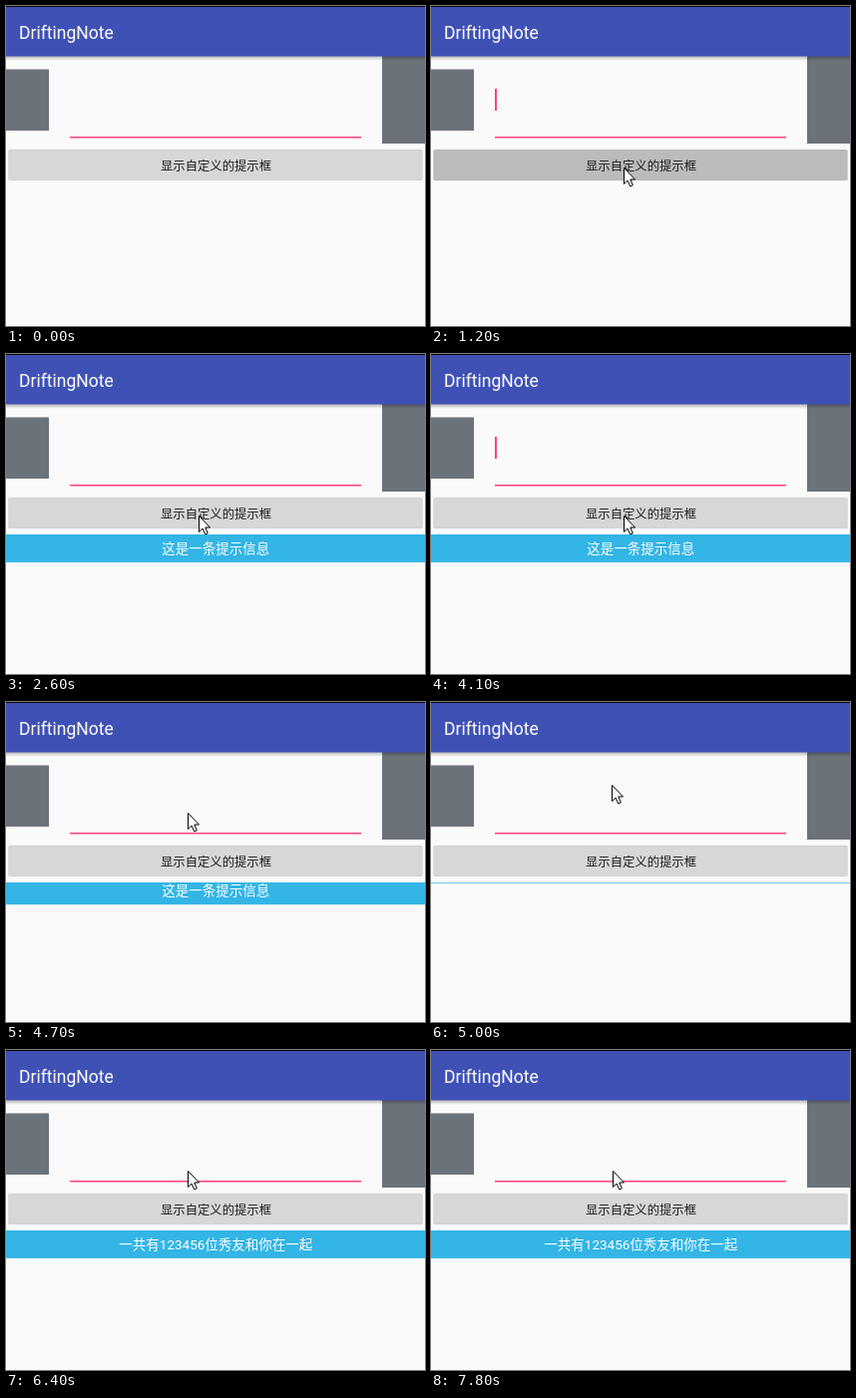
Animation of 420 by 321 pixels, one loop 8000 ms. Source, as an HTML page with a canvas:

```html
<!DOCTYPE html>
<html lang="zh-CN">
<head>
<meta charset="utf-8">
<title>DriftingNote</title>
<style>
  html, body { margin: 0; width: 100%; height: 100%; overflow: hidden; background: #fafafa; }
  canvas { display: block; width: 420px; height: 321px; }
</style>
</head>
<body>
<canvas id="stage" width="420" height="321"></canvas>
<script>
const ctx = document.getElementById('stage').getContext('2d');
const W = 420, H = 321, LOOP = 8000, STEP = 100;
const FONT = 'Roboto, "Noto Sans CJK SC", "Noto Sans CJK", sans-serif';
const PINK = '#ff4081', SLATE = '#6c727a';
const TOAST = { y: 181, h: 28, slide: 500 };

const toasts = [
  { text: '这是一条提示信息', from: 1320, leave: 4550 },
  { text: '一共有123456位秀友和你在一起', from: 5920, leave: Infinity }
];

// Intervals in which the text caret is lit
const caretOn = [[200, 700], [1200, 1700], [2200, 2600], [3100, 3600],
  [4100, 4600], [5100, 5500], [5800, 6300], [7400, 7800]];

// Pointer path: time, x, y
const pointerPath = [[200, 389, 165], [500, 270, 164], [800, 193, 162],
  [4400, 193, 162], [4700, 182, 111], [5000, 181, 83], [5300, 181, 73],
  [5800, 180, 64], [6000, 181, 72], [6200, 182, 97], [6400, 182, 121]];

const clamp = v => Math.min(1, Math.max(0, v));
const ease = p => 0.5 - Math.cos(Math.PI * clamp(p)) / 2;
const mix = (a, b, p) => a + (b - a) * p;

function rect(x, y, w, h, color) {
  ctx.fillStyle = color;
  ctx.fillRect(x, y, w, h);
}

function label(text, x, y, size, color, align = 'center') {
  ctx.font = `${size}px ${FONT}`;
  ctx.textAlign = align;
  ctx.fillStyle = color;
  ctx.fillText(text, x, y);
}

function drawPage() {
  rect(0, 0, W, H, '#fafafa');
  rect(0, 63.5, 43, 61.5, SLATE);
  rect(377, 50, 43, 88, SLATE);
  const shadow = ctx.createLinearGradient(0, 50, 0, 55);
  shadow.addColorStop(0, 'rgba(0,0,0,0.28)');
  shadow.addColorStop(1, 'rgba(0,0,0,0)');
  rect(0, 50, W, 5, shadow);
  rect(0, 0, W, 50.5, '#3f51b5');
  rect(0, 0, W, 1, '#000');
  label('DriftingNote', 13, 32.5, 17.5, '#fff', 'left');
  rect(64, 131, 292, 1.5, PINK);
}

function drawButton(t) {
  const press = t < 1200 ? 0 : 1 - clamp((t - 1300) / 400);
  const shade = Math.round(mix(215, 187, press));
  ctx.fillStyle = `rgb(${shade - 1},${shade},${shade})`;
  ctx.beginPath();
  ctx.roundRect(2.5, 144, 415, 31, 1.5);
  ctx.fill();
  ctx.strokeStyle = 'rgba(0,0,0,0.05)';
  ctx.lineWidth = 1;
  ctx.stroke();
  label('显示自定义的提示框', 210.5, 164.6, 12.33, '#1c1c1c');
}

function drawToast({ text, from, leave }, t) {
  const shown = ease((t - from) / TOAST.slide) - ease((t - leave) / TOAST.slide);
  if (shown <= 0) return;
  ctx.save();
  ctx.beginPath();
  ctx.rect(0, TOAST.y, W, TOAST.h);
  ctx.clip();
  ctx.translate(0, TOAST.y - TOAST.h * (1 - shown));
  rect(0, 0, W, TOAST.h, '#33b5e5');
  label(text, 210.3, 19.2, 13.5, '#fff');
  ctx.restore();
}

function pointerAt(t) {
  const next = pointerPath.findIndex(p => p[0] > t);
  if (next < 0) return pointerPath[pointerPath.length - 1].slice(1);
  const [t0, x0, y0] = pointerPath[next - 1];
  const [t1, x1, y1] = pointerPath[next];
  const p = (t - t0) / (t1 - t0);
  return [mix(x0, x1, p), mix(y0, y1, p)];
}

function drawPointer(t) {
  if (t < pointerPath[0][0]) return;
  const [x, y] = pointerAt(t).map(Math.round);
  ctx.save();
  ctx.translate(x + 0.5, y + 0.5);
  const arrow = new Path2D('M0 0V16L3.6 12.6L6.2 18.4L8.8 17.3L6.3 11.5H11Z');
  ctx.fillStyle = '#fff';
  ctx.fill(arrow);
  ctx.strokeStyle = '#000';
  ctx.lineWidth = 1;
  ctx.stroke(arrow);
  ctx.restore();
}

function draw(now) {
  const t = Math.floor((now % LOOP) / STEP) * STEP;
  drawPage();
  if (caretOn.some(([a, b]) => t >= a && t < b)) rect(64, 83, 2, 22, PINK);
  drawButton(t);
  toasts.forEach(toast => drawToast(toast, t));
  drawPointer(t);
}

const start = performance.now();
function tick() {
  draw(performance.now() - start);
  requestAnimationFrame(tick);
}
tick();
</script>
</body>
</html>
```
